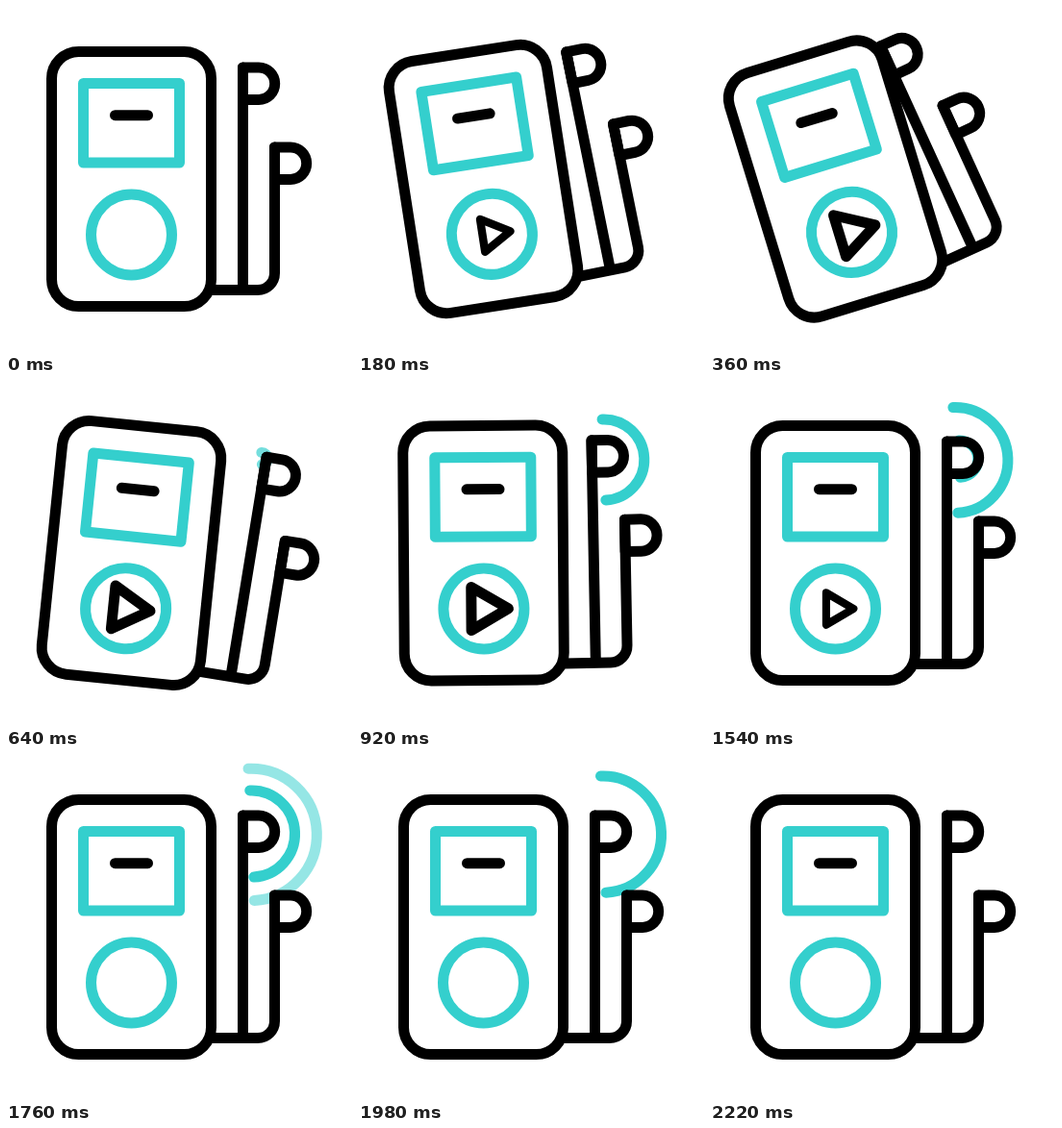
These frames come from a looping animation (360 px wide and 360 px high, 2400 ms). An HTML page with a canvas:

```html
<!DOCTYPE html>
<html lang="en">
<head>
<meta charset="utf-8">
<title>Music player</title>
<style>
html, body { margin: 0; width: 100%; height: 100%; overflow: hidden; background: #fff; }
canvas { display: block; width: 360px; height: 360px; }
</style>
</head>
<body>
<canvas id="stage"></canvas>
<script>
const LOOP = 2400;
const BLACK = '#000';
const CYAN = '#34cfcd';
const canvas = document.getElementById('stage');
const ctx = canvas.getContext('2d');
const ratio = window.devicePixelRatio || 1;
canvas.width = canvas.height = 360 * ratio;

const linear = u => u;
const smooth = u => (1 - Math.cos(Math.PI * u)) / 2;
const clamp = u => Math.min(1, Math.max(0, u));

// Interpolates between [time, value] keys.
function track(keys, t, ease) {
  if (t <= keys[0][0]) return keys[0][1];
  for (let i = 1; i < keys.length; i++) {
    const [t0, v0] = keys[i - 1];
    const [t1, v1] = keys[i];
    if (t < t1) return v0 + (v1 - v0) * ease((t - t0) / (t1 - t0));
  }
  return keys[keys.length - 1][1];
}

const SWING = [[0, 0], [355, -17.1], [575, 8], [800, -3], [960, 0]];
const GROWTH = [[0, 0], [40, 6], [265, 36], [320, 42], [480, 54.5], [720, 69.5], [800, 73]];
const PLAY = [[100, 0], [220, 1], [1500, 1], [1620, 0]];
const WAVE_STARTS = [600, 1055, 1402];
const WAVE_LIFE = 800;
const CABLE_LAG = 40;

function rotateAbout(x, y, degrees) {
  ctx.translate(x, y);
  ctx.rotate(degrees * Math.PI / 180);
  ctx.translate(-x, -y);
}

function stroke(color, build) {
  ctx.strokeStyle = color;
  ctx.beginPath();
  build();
  ctx.stroke();
}

function drawWave(age) {
  if (age <= 0 || age >= WAVE_LIFE) return;
  const r = track(GROWTH, age, linear);
  const x = 254.5 + 17 * Math.exp(-r / 16);
  const y = 81.5 + r * 0.035;
  ctx.globalAlpha = Math.min(clamp(age / 60), clamp((WAVE_LIFE - age) / 180));
  stroke(CYAN, () => ctx.arc(x, y, r, -1.61, 1.52));
  ctx.globalAlpha = 1;
}

function earbud(x, y) {
  stroke(BLACK, () => {
    ctx.moveTo(x, y);
    ctx.lineTo(x + 16.5, y);
    ctx.arc(x + 16.5, y + 16.7, 16.7, -Math.PI / 2, Math.PI / 2);
    ctx.lineTo(x, y + 33.4);
    ctx.closePath();
  });
}

function drawEarphones() {
  stroke(BLACK, () => {
    ctx.moveTo(213.5, 295.5);
    ctx.lineTo(262, 295.5);
    ctx.arcTo(279.5, 295.5, 279.5, 278, 17.5);
    ctx.lineTo(279.5, 147);
    ctx.moveTo(246.5, 290);
    ctx.lineTo(246.5, 64);
  });
  earbud(246.5, 64);
  earbud(279.5, 147);
}

function drawPlay(size) {
  if (size <= 0) return;
  ctx.save();
  ctx.translate(130.5, 238);
  ctx.scale(size, size);
  stroke(BLACK, () => {
    ctx.moveTo(-13, -22.5);
    ctx.lineTo(25.5, 0);
    ctx.lineTo(-13, 22.5);
    ctx.closePath();
  });
  ctx.restore();
}

function drawPlayer(playSize) {
  ctx.fillStyle = '#fff';
  stroke(BLACK, () => {
    ctx.roundRect(47.5, 47.5, 166, 265, 28);
    ctx.fill();
  });
  stroke(CYAN, () => ctx.rect(80.5, 80.5, 100, 82.5));
  stroke(BLACK, () => {
    ctx.moveTo(113.5, 113.7);
    ctx.lineTo(147.5, 113.7);
  });
  stroke(CYAN, () => ctx.arc(130.5, 238, 42, 0, 2 * Math.PI));
  drawPlay(playSize);
}

function draw(t) {
  ctx.setTransform(ratio, 0, 0, ratio, 0, 0);
  ctx.fillStyle = '#fff';
  ctx.fillRect(0, 0, 360, 360);
  ctx.lineWidth = 11;
  ctx.lineCap = ctx.lineJoin = 'round';

  WAVE_STARTS.forEach(start => drawWave(t - start));

  ctx.save();
  rotateAbout(130.5, 180, track(SWING, t, smooth));
  ctx.save();
  rotateAbout(213.5, 295, 0.45 * track(SWING, t - CABLE_LAG, smooth));
  drawEarphones();
  ctx.restore();
  drawPlayer(track(PLAY, t, smooth));
  ctx.restore();
}

const begin = performance.now();
function tick() {
  draw((performance.now() - begin) % LOOP);
  requestAnimationFrame(tick);
}
tick();
</script>
</body>
</html>
```
